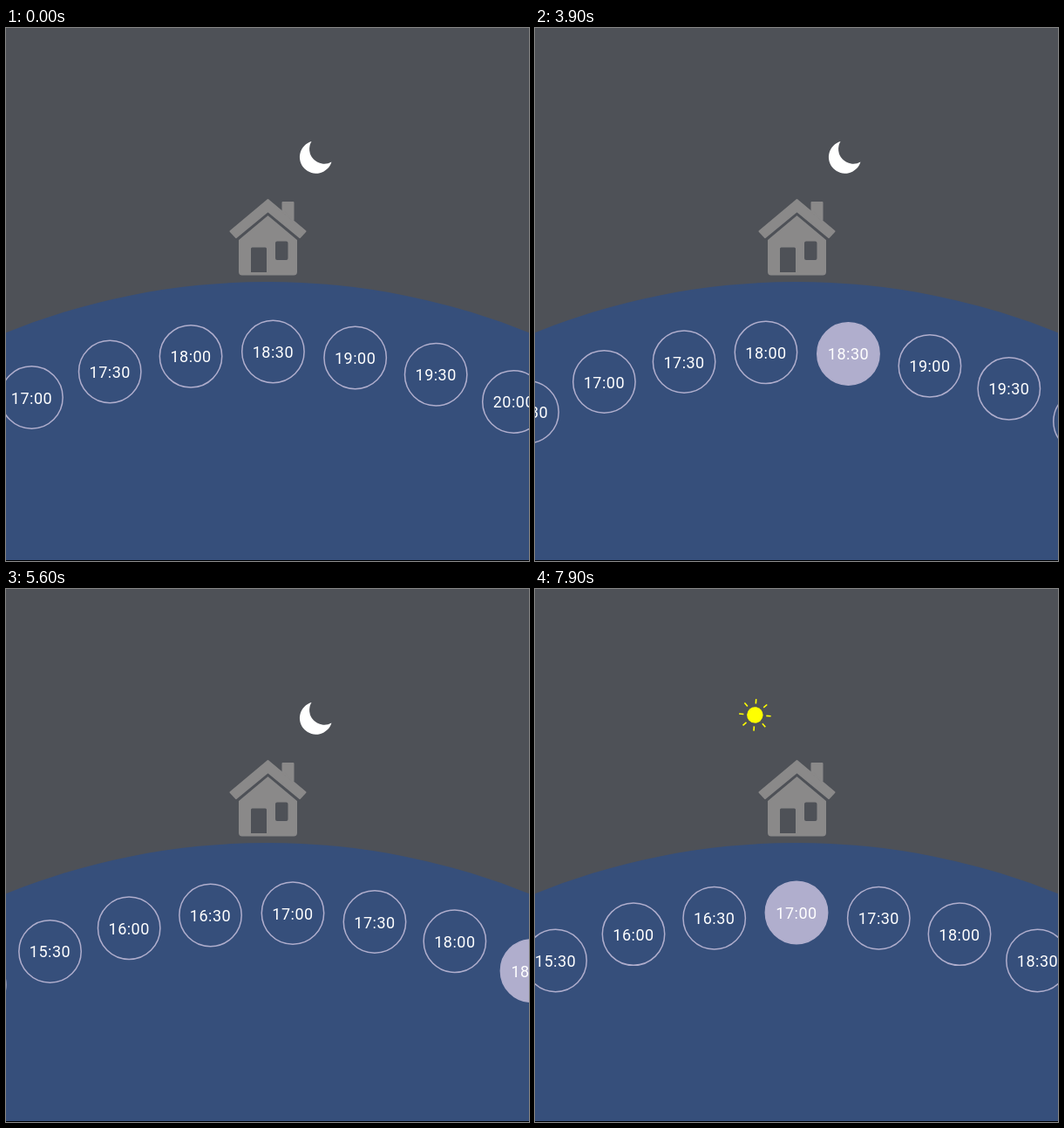
An HTML page for the animation above (8 s loop, 600x611 px).

```html
<!DOCTYPE html>
<html lang="en">
<head>
<meta charset="utf-8">
<title>Time dial</title>
<style>
  html, body { margin: 0; width: 100%; height: 100%; overflow: hidden; background: #4e5157; }
  svg { display: block; width: 100vw; height: 100vh; }
  text { font: 18px Roboto, sans-serif; letter-spacing: .5px; text-anchor: middle; fill: #fff; }
  .slot circle { stroke: #b0aecd; stroke-width: 1.5; fill: #b0aecd; }
</style>
</head>
<body>
<svg viewBox="0 0 600 611">
  <rect width="600" height="611" fill="#4e5157"/>

  <path id="moon" fill="#fff" d="M350.5 130A18.7 18.7 0 1 0 373.5 153.5A17 17 0 0 1 350.5 130Z"/>

  <g id="sun" fill="#ff0" stroke="#ff0" stroke-width="1.6">
    <circle r="9.2" stroke="none"/>
  </g>

  <g fill="#8a8989" stroke="#8a8989" stroke-width="2" stroke-linejoin="round">
    <path d="M300.5 197L343.5 233L337 240L300.5 210L264 240L257.5 233Z"/>
    <path d="M317.5 200H329.5V220L317.5 210Z"/>
    <path fill-rule="evenodd" stroke="none" d="M300.5 215L334 243V279.500Q334 283.500 330 283.500H271Q267 283.500 267 279.500V243Z
      M282.500 251.500H297.500Q299 251.500 299 253V280H281V253Q281 251.500 282.500 251.500Z
      M311 244.500H321.500Q323.500 244.500 323.500 246.500V264Q323.500 266 321.500 266H311Q309 266 309 264V246.500Q309 244.500 311 244.500Z"/>
  </g>

  <circle cx="300" cy="1093.500" r="802.500" fill="#364f7b"/>
  <g id="dial"></g>
  <rect y="610" width="600" height="1" fill="#000"/>
</svg>
<script>
const LOOP = 8000, STEP = 100;
const CENTER = { x: 300, y: 1093.5 }, DIAL_RADIUS = 722.5, SLOT_ANGLE = 7.5;
const ORBIT = { x: 300, y: 248, radius: 114, tilt: 29 };
const SWITCH_TIME = 7400;

const byId = id => document.getElementById(id);
const clamp = v => Math.min(1, Math.max(0, v));
const smooth = p => p * p * (3 - 2 * p);
const rad = deg => deg * Math.PI / 180;

function add(parent, tag, attrs = {}) {
  const node = document.createElementNS('http://www.w3.org/2000/svg', tag);
  for (const key in attrs) node.setAttribute(key, attrs[key]);
  return parent.appendChild(node);
}

for (let angle = 0; angle < 360; angle += 45) {
  add(byId('sun'), 'line', { y1: -13, y2: -18.3, transform: `rotate(${angle})` });
}

// Slots are half hours, counted from 18:30.
const slots = [];
for (let index = -9; index <= 4; index++) {
  const group = add(byId('dial'), 'g', { class: 'slot' });
  const disc = add(group, 'circle', { r: 35.7 });
  const minutes = 1110 + index * 30;
  add(group, 'text', { y: 7 }).textContent =
    `${Math.floor(minutes / 60)}:${String(minutes % 60).padStart(2, '0')}`;
  slots.push({ index, group, disc });
}

// Dial rotation in degrees: settle, rest, fling, then snap to 17:00.
function dialAngle(t) {
  if (t < 3800) return 0.508 * (1 - clamp(t / 950)) ** 2;
  if (t < 3900) return 4.72 * (t - 3800) / 100;
  if (t < 5100) return 26.82 - 22.1 * Math.exp((3900 - t) / 365);
  return 22.5 + 3.5 * (1 - clamp((t - 5100) / 2250)) ** 1.67;
}

function selection(index, t) {
  const switched = clamp((t - SWITCH_TIME + 100) / 300);
  if (index === 0) return clamp((t - 900) / 300) * (1 - switched);
  return index === -3 ? switched : 0;
}

function draw(t) {
  const rotation = dialAngle(t);
  for (const { index, group, disc } of slots) {
    const a = rad(index * SLOT_ANGLE + rotation);
    const x = CENTER.x + DIAL_RADIUS * Math.sin(a);
    const y = CENTER.y - DIAL_RADIUS * Math.cos(a);
    group.setAttribute('transform', `translate(${x} ${y})`);
    disc.setAttribute('fill-opacity', selection(index, t));
  }

  const isDay = t >= SWITCH_TIME;
  byId('moon').style.display = isDay ? 'none' : '';
  byId('sun').style.display = isDay ? '' : 'none';
  const turn = ORBIT.tilt * (1 - 2 * smooth(clamp((t - SWITCH_TIME) / 600)));
  const x = ORBIT.x + ORBIT.radius * Math.sin(rad(turn));
  const y = ORBIT.y - ORBIT.radius * Math.cos(rad(turn));
  byId('sun').setAttribute('transform', `translate(${x} ${y}) rotate(${turn + ORBIT.tilt})`);
}

const start = performance.now();
function tick() {
  const t = (performance.now() - start) % LOOP;
  draw(Math.floor(t / STEP) * STEP);
  requestAnimationFrame(tick);
}
tick();
</script>
</body>
</html>
```
